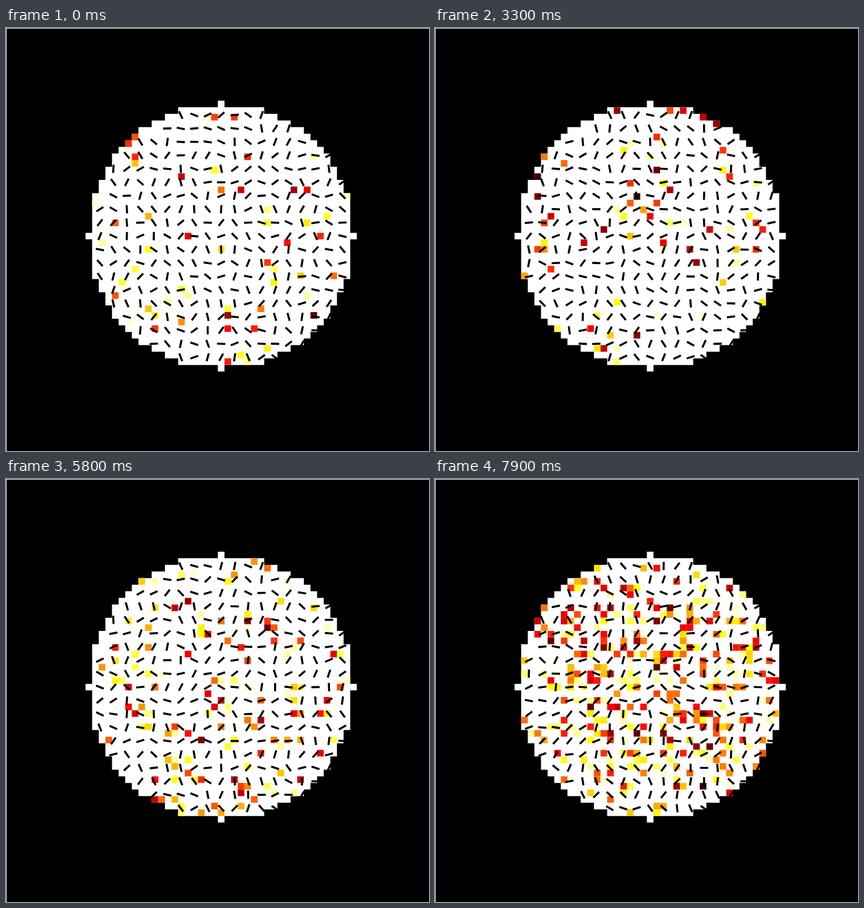
Write an HTML page that moves like this. It is 748 px wide and 749 px high and loops after 8 s.

```html
<!DOCTYPE html>
<html lang="en">
<head>
<meta charset="utf-8">
<title>Orientation map</title>
<style>
  html, body { margin: 0; width: 100%; height: 100%; overflow: hidden; background: #fff; }
  svg { display: block; width: 748px; height: 749px; }
</style>
</head>
<body>
<svg id="stage" viewBox="0 0 748 749">
  <rect x="1" y="1" width="747" height="748" fill="#000"/>
  <g id="disk" fill="#fff"></g>
  <g id="cells"></g>
  <g id="bars" stroke="#000" stroke-width="3.6"></g>
</svg>
<script>
const STEP = 100, STEPS = 80, RADIUS = 20;
const CENTER_X = 380.5, CENTER_Y = 368.5;
const PITCH = 11.7, BAR_PITCH = 23.83, BAR_HALF = 7.3;

// Bar count left and right of the middle column, for each row from top to bottom.
const LEFT = [3, 4, 6, 7, 8, 8, 8, 9, 9, 9, 9, 9, 9, 8, 8, 7, 6, 5, 3];
const RIGHT = [3, 5, 6, 8, 8, 9, 9, 9, 9, 9, 9, 9, 9, 9, 8, 8, 7, 6, 4];

// Bars on the rim keep their angle, in degrees.
const RIM = {
  '-3,-9': 65, '3,-9': -70, '8,-6': -30, '9,-4': -35,
  '9,4': 5, '8,6': -65, '7,7': 0, '6,8': -60, '4,9': 35
};

function random(seed) {
  let s = seed;
  return () => {
    s = (s + 0x6D2B79F5) | 0;
    let h = Math.imul(s ^ (s >>> 15), 1 | s);
    h = (h + Math.imul(h ^ (h >>> 7), 61 | h)) ^ h;
    return ((h ^ (h >>> 14)) >>> 0) / 4294967296;
  };
}

function add(parent, tag, attributes) {
  const node = document.createElementNS('http://www.w3.org/2000/svg', tag);
  for (const key in attributes) node.setAttribute(key, attributes[key]);
  return document.getElementById(parent).appendChild(node);
}

// White through yellow and red to black.
function heat(value) {
  const h = 1 - value;
  const channel = x => Math.round(255 * Math.max(0, Math.min(1, x)));
  return `rgb(${channel(0.04 + h / 0.38)},${channel((h - 0.365) / 0.381)},${channel((h - 0.746) / 0.254)})`;
}

const edgeX = i => CENTER_X + (i - 0.5) * PITCH;
const edgeY = i => CENTER_Y + (i - 0.5) * PITCH;

const cells = [], rightSide = [], leftSide = [];
for (let dy = -RADIUS; dy <= RADIUS; dy++) {
  const reach = Math.floor(Math.sqrt(RADIUS * RADIUS - dy * dy));
  const top = edgeY(dy), bottom = edgeY(dy + 1);
  const left = edgeX(-reach), right = edgeX(reach + 1);
  rightSide.push(`${right},${top}`, `${right},${bottom}`);
  leftSide.unshift(`${left},${bottom}`, `${left},${top}`);
  for (let dx = -reach; dx <= reach; dx++) {
    const node = add('cells', 'rect', { x: edgeX(dx), y: top, width: PITCH, height: PITCH });
    const r = Math.hypot(dx, dy) / RADIUS;
    cells.push({ node, r, tip: dx * dy === 0 && r === 1 });
  }
}
add('disk', 'polygon', { points: rightSide.concat(leftSide).join(' ') });

const bars = [];
LEFT.forEach((left, row) => {
  const v = row - 9;
  for (let u = -left; u <= RIGHT[row]; u++) {
    bars.push({ node: add('bars', 'path', {}), u, v, fixed: RIM[u + ',' + v] });
  }
});

function barPath({ u, v }, angle) {
  const x = CENTER_X + u * BAR_PITCH, y = CENTER_Y + v * BAR_PITCH;
  const c = BAR_HALF * Math.cos(angle), s = BAR_HALF * Math.sin(angle);
  return `M${x - c} ${y - s}L${x + c} ${y + s}`;
}

// Random angles that lean towards a smooth map as order grows.
function barAngle({ u, v, fixed }, noise, order) {
  if (fixed !== undefined) return fixed * Math.PI / 180;
  const a = 2 * Math.PI * noise;
  const b = -0.42 * Math.abs(v) + Math.sin(u * 0.7);
  return Math.atan2(
    (1 - order) * Math.sin(a) + order * Math.sin(b),
    (1 - order) * Math.cos(a) + order * Math.cos(b)
  ) / 2;
}

function draw(step) {
  const rand = random(7919 * (step + 1));
  const late = Math.pow(step / (STEPS - 1), 4);
  for (const cell of cells) {
    const density = 0.045 + 0.2 * late * (1.5 - cell.r * cell.r);
    const lit = rand() < density && !(cell.tip && step > 18);
    const value = 0.03 + rand() * (0.6 + 0.33 * rand());
    cell.node.setAttribute('fill', lit ? heat(value) : 'none');
  }
  for (const bar of bars) {
    bar.node.setAttribute('d', barPath(bar, barAngle(bar, rand(), 0.45 * late)));
  }
}

let shown = -1;
const start = performance.now();
function tick(now) {
  const step = Math.floor(Math.max(0, now - start) / STEP) % STEPS;
  if (step !== shown) draw(shown = step);
  requestAnimationFrame(tick);
}
tick(start);
</script>
</body>
</html>
```
